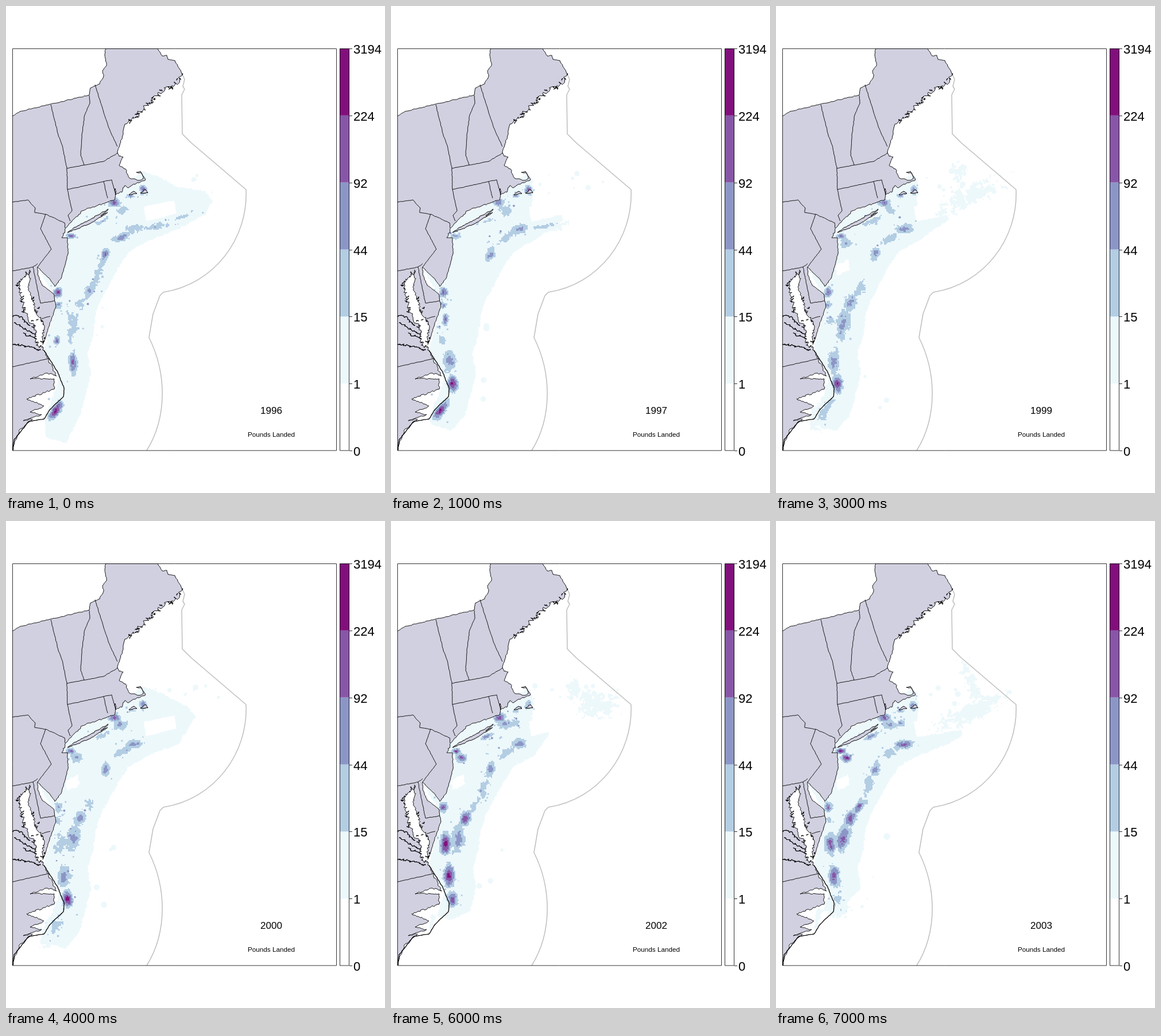
An HTML page with a canvas for the animation above (8 s loop, 660x849 px).

```html
<!DOCTYPE html>
<html lang="en">
<head>
<meta charset="utf-8">
<title>Pounds landed by year</title>
<style>
html, body { margin: 0; width: 100%; height: 100%; overflow: hidden; background: #fff; }
canvas { display: block; }
</style>
</head>
<body>
<canvas id="map" width="660" height="849"></canvas>
<script>
const ctx = document.getElementById('map').getContext('2d');
const COLORS = ['#fff', '#edf8fb', '#b3cde3', '#8c96c6', '#8856a7', '#810f7c'];
const LABELS = [0, 1, 15, 44, 92, 224, 3194];
const LAND = '#d1d0e0';
const FIRST_YEAR = 1996, YEAR_COUNT = 8, CELL = 2;

// Key points of the mainland boundary, each stretch with its own roughness
const NORTH_COAST = '307,120 296,135 270,153 248,170 237,184 207,206';
const BAY = '64,590 67,558 55,540 47,515 38,490 42,464 25,480 22,492 34,535 52,565 50,580 64,600';
const MAINLAND = [
  [.7, '11,192 24,184 145,155 147,143 163,136 170,122 168,113 175,104 172,86 173,74'],
  [.6, '264,74 272,87 280,86 282,93 294,95 304,112'],
  [4.5, NORTH_COAST],
  [1, '205,213 204,224 194,254 197,262 204,263 197,278 208,284 215,300 232,304 239,301 236,291 227,290 234,288 243,303 230,308 220,312'],
  [1.4, '213,317 207,313 203,322 191,329 190,318 190,337 174,343 133,357 104,387 97,404'],
  [.6, '107,404 108,432 96,475 85,489 77,477 55,455 56,470 63,487 83,502 87,524 76,555 67,583'],
  [2.8, BAY],
  [1.4, '66,600 88,645 72,640 42,650 84,650 84,668 36,685 66,697 42,708 62,712 30,723 46,720 24,738 13,768 11,775']
];
const ISLANDS = [
  '107,395 125,383 150,370 178,354 165,366 177,360 145,380 107,395',
  '214,329 222,323 228,327 214,329', '234,326 243,320 247,326 234,326'
];
const BORDERS = [
  '78,172 91,225 98,243 106,283 107,320 115,357 108,365 112,375', '106,283 170,271 195,256',
  '145,156 146,170 137,190 132,225 130,260 136,277', '155,137 178,210 194,245',
  '107,320 184,303 191,328', '170,306 177,335', '11,342 38,338 51,352 50,360 69,363 102,378 103,387',
  '69,363 60,388 79,424 55,455', '11,462 47,455 55,449', '47,455 60,518 85,514', '62,545 77,541', '11,629 73,615'
];
const RIVERS = ['11,541 22,540 42,557', '14,552 50,572', '30,570 53,581', '11,590 30,592 60,600'];
const BANKS = '66,600 90,638 101,666 100,681 77,703 66,720 40,724 14,756 12,775';

// Fished area: shelf edge from north-east to south, and the shore that closes it
const EDGE = '340,367 300,389 250,408 214,428 196,455 180,485 165,512 156,540 152,575 142,605 148,640 138,680 128,715';
const SHORE = '66,720 85,672 92,650 66,600 84,530 82,503 55,458 85,480 100,440 98,400 110,372 180,335 212,308';
const EAST = [360, 300, 310, 301, 330, 337, 275, 325];
const SOUTH = [762, 740, 758, 741, 745, 738, 696, 685];
const BANK_OPEN = '10001100';
const CLOSED_AREA = '240,350 293,339 297,362 244,375 240,350';
const EMPTY_COAST = '104,452 126,442 128,460 107,470 104,452';

// Fishing grounds: x, y, radii, tilt in degrees, peak class in each year
const GROUNDS = [
  [112, 400, 10, 6, 0, '43444555'], [121, 411, 11, 9, 0, '00333345'],
  [165, 373, 16, 5, -25, '22122333'], [187, 341, 13, 9, 0, '43344444'],
  [197, 354, 14, 10, 0, '22223333'], [238, 319, 7, 10, 0, '44333433'],
  [215, 330, 8, 4, 0, '33332333'], [216, 351, 8, 7, 0, '00000023'],
  [222, 387, 18, 9, -10, '23333334'], [200, 402, 20, 8, -30, '32222222'],
  [171, 432, 9, 15, 15, '43333333'], [262, 383, 28, 6, -8, '22000000'],
  [305, 366, 24, 5, -20, '20000000'], [160, 464, 8, 26, 15, '20001222'],
  [143, 495, 9, 17, 25, '31222324'], [128, 518, 11, 18, 25, '21233344'],
  [115, 552, 14, 30, 10, '21233334'], [93, 562, 12, 24, 0, '00112354'],
  [90, 497, 9, 11, 0, '54443344'], [90, 520, 7, 8, 0, '33332212'],
  [87, 582, 7, 9, 0, '42111100'], [93, 546, 7, 12, 0, '04220000'],
  [100, 617, 12, 24, 0, '03233454'], [116, 622, 9, 24, 0, '40000000'],
  [106, 658, 11, 19, -5, '05555542'], [85, 704, 10, 24, 35, '55222000'],
  [337, 330, 50, 14, -25, '00010001'], [358, 317, 28, 20, 0, '00000010'],
  [340, 285, 9, 34, -20, '00000001'], [318, 290, 10, 16, 0, '00010010']
];

let seed = 1;
const random = () => (seed = seed * 16807 % 2147483647) / 2147483647;
const jitter = amount => (random() * 2 - 1) * amount;
const parse = text => text.split(' ').map(pair => pair.split(',').map(Number));

// Splits a line into short steps and shifts the inner points.
function roughen(points, amount, step = 3) {
  return points.flatMap(([x, y], i) => {
    const [x2, y2] = points[i + 1] || [x, y];
    const n = Math.ceil(Math.hypot(x2 - x, y2 - y) / step) || 1;
    return Array.from({ length: n }, (_, k) => {
      const shift = k ? amount : 0;
      return [x + (x2 - x) * k / n + jitter(shift), y + (y2 - y) * k / n + jitter(shift)];
    });
  });
}

function draw(points, { fill, stroke, width = 1 }) {
  ctx.beginPath();
  points.forEach(p => ctx.lineTo(...p));
  if (fill) { ctx.fillStyle = fill; ctx.fill(); }
  if (stroke) { ctx.strokeStyle = stroke; ctx.lineWidth = width; ctx.stroke(); }
}

function disc(x, y, r, color) {
  ctx.fillStyle = color;
  ctx.beginPath();
  ctx.arc(x, y, r, 0, 7);
  ctx.fill();
}

// Smooth noise from 0 to 1 on a lattice of unit squares
function noise(x, y, salt) {
  const hash = (i, j) => {
    const s = Math.sin(i * 127.1 + j * 311.7 + salt * 74.7) * 43758.5;
    return s - Math.floor(s);
  };
  const i = Math.floor(x), j = Math.floor(y), u = x - i, v = y - j;
  return (hash(i, j) * (1 - u) + hash(i + 1, j) * u) * (1 - v)
    + (hash(i, j + 1) * (1 - u) + hash(i + 1, j + 1) * u) * v;
}

function drawSea(year) {
  const east = EAST[year], south = SOUTH[year];
  const top = BANK_OPEN[year] === '1'
    ? [[238, 288], [262, 296], [300, 316], [east - 15, 322], [east, 340], [east - 15, 365]]
    : [[238, 292], [246, 300], [246, 376], [east - 3, 364], [east, 372]];
  const edge = parse(EDGE).filter(([x, y]) => x < east - 10 && y < south - 5);
  const area = [...top, ...edge, [105, south], [70, south - 10], ...parse(SHORE)];
  draw(roughen(area, 1.5), { fill: COLORS[1] });
  draw(roughen(parse(CLOSED_AREA), .6), { fill: COLORS[0] });
  if (year > 1) draw(roughen(parse(EMPTY_COAST), 2), { fill: COLORS[0] });
}

// Each ground falls off from its peak class; noise breaks up the class limits.
function drawGrounds(year) {
  const classes = new Map();
  for (const [cx, cy, rx, ry, tilt, levels] of GROUNDS) {
    const peak = +levels[year];
    if (!peak) continue;
    const cos = Math.cos(tilt * Math.PI / 180), sin = Math.sin(tilt * Math.PI / 180);
    const reach = Math.ceil(Math.max(rx, ry) * .8) * CELL;
    for (let dy = -reach; dy <= reach; dy += CELL) {
      for (let dx = -reach; dx <= reach; dx += CELL) {
        const x = Math.round((cx + dx) / CELL) * CELL, y = Math.round((cy + dy) / CELL) * CELL;
        const distance = Math.hypot((dx * cos + dy * sin) / rx, (dy * cos - dx * sin) / ry);
        const rough = noise(x / 7, y / 7, year) + noise(x / 3, y / 3, year + 9) - 1;
        const value = Math.floor(peak + .7 - Math.max(peak - 1, .7) * distance + rough * .9);
        const key = x + y * 1000;
        if (value > 0) classes.set(key, Math.max(classes.get(key) || 0, Math.min(value, peak)));
      }
    }
  }
  classes.forEach((value, key) => {
    ctx.fillStyle = COLORS[value];
    ctx.fillRect(key % 1000, Math.floor(key / 1000), CELL, CELL);
  });
}

function drawSpeckles(year) {
  const busy = GROUNDS.filter(ground => ground[5][year] > 1);
  for (let i = 0; i < 55; i++) {
    const [x, y, rx, ry] = busy[Math.floor(random() * busy.length)];
    disc(x + jitter(rx * 1.7), y + jitter(ry * 1.5), .8 + random() * 1.3, COLORS[random() < .8 ? 2 : 3]);
  }
  for (let i = 0; i < 9; i++) {
    disc(250 + random() * 125, 285 + random() * 42, 1 + random() * 4, COLORS[1]);
  }
  for (let i = 0; i < 4; i++) disc(150 + random() * 45, 520 + random() * 180, 1 + random() * 5, COLORS[1]);
}

// Short ragged marks along a shore: islets and creeks
function drawCreeks(shore, spread, share) {
  for (const [x, y] of roughen(parse(shore), spread)) {
    if (random() > share) continue;
    draw(roughen([[x, y], [x + jitter(5), y + jitter(4)]], 1.2, 1.5), { stroke: '#000', width: 1.3 });
  }
}

function drawLand() {
  const line = { stroke: '#000', width: .9 };
  const coast = MAINLAND.flatMap(([amount, points]) => roughen(parse(points), amount));
  draw(coast, { fill: LAND, ...line });
  ISLANDS.forEach(points => draw(roughen(parse(points), .8), { fill: LAND, stroke: '#000' }));
  BORDERS.forEach(points => draw(roughen(parse(points), .4), line));
  RIVERS.forEach(points => draw(roughen(parse(points), 2, 2), { stroke: '#000', width: 1.3 }));
  draw(roughen(parse(BANKS), .4), { stroke: '#000', width: 1.3 });
  drawCreeks(NORTH_COAST, 4, .45);
  drawCreeks(BAY, 3, .35);
}

function drawLimit() {
  ctx.beginPath();
  parse('296,106 308,121 311,128 308,140 311,145 306,155 307,223 322,238 418,320').forEach(p => ctx.lineTo(...p));
  ctx.bezierCurveTo(422, 405, 363, 485, 274, 499);
  parse('268,505 256,537 249,578').forEach(p => ctx.lineTo(...p));
  ctx.bezierCurveTo(280, 640, 281, 717, 245, 775);
  ctx.strokeStyle = '#bebebe';
  ctx.lineWidth = 1.5;
  ctx.stroke();
}

function text(value, x, y, size, align) {
  ctx.font = `${size}px "Liberation Sans", Arial, sans-serif`;
  ctx.textAlign = align;
  ctx.fillStyle = '#000';
  ctx.fillText(value, x, y);
}

function box(x, y, width, height) {
  ctx.strokeStyle = '#000';
  ctx.lineWidth = .8;
  ctx.strokeRect(x, y, width, height);
}

function drawScale() {
  const step = 701 / 6;
  COLORS.forEach((color, i) => {
    ctx.fillStyle = color;
    ctx.fillRect(581, 775 - (i + 1) * step, 17, step);
  });
  box(581.5, 74.5, 16, 700.5);
  LABELS.forEach((label, i) => {
    const y = Math.round(775 - i * step) + .5;
    draw([[598, y], [603, y]], { stroke: '#000', width: .8 });
    text(label, 605, y + 8.5, 22, 'left');
  });
}

function render(year) {
  ctx.fillStyle = '#fff';
  ctx.fillRect(0, 0, 660, 849);
  ctx.lineJoin = 'round';
  ctx.save();
  ctx.beginPath();
  ctx.rect(11, 74, 564, 701);
  ctx.clip();
  seed = 4217 + year * 1013;
  drawSea(year);
  drawGrounds(year);
  drawSpeckles(year);
  drawLimit();
  seed = 99;
  drawLand();
  ctx.restore();
  box(11.5, 74.5, 564, 700.5);
  drawScale();
  text(FIRST_YEAR + year, 462, 711, 17, 'center');
  text('Pounds Landed', 462, 751, 11.7, 'center');
}

let shown = -1;
function tick() {
  const year = Math.floor(performance.now() / 1000) % YEAR_COUNT;
  if (year !== shown) render(shown = year);
  requestAnimationFrame(tick);
}
tick();
</script>
</body>
</html>
```
